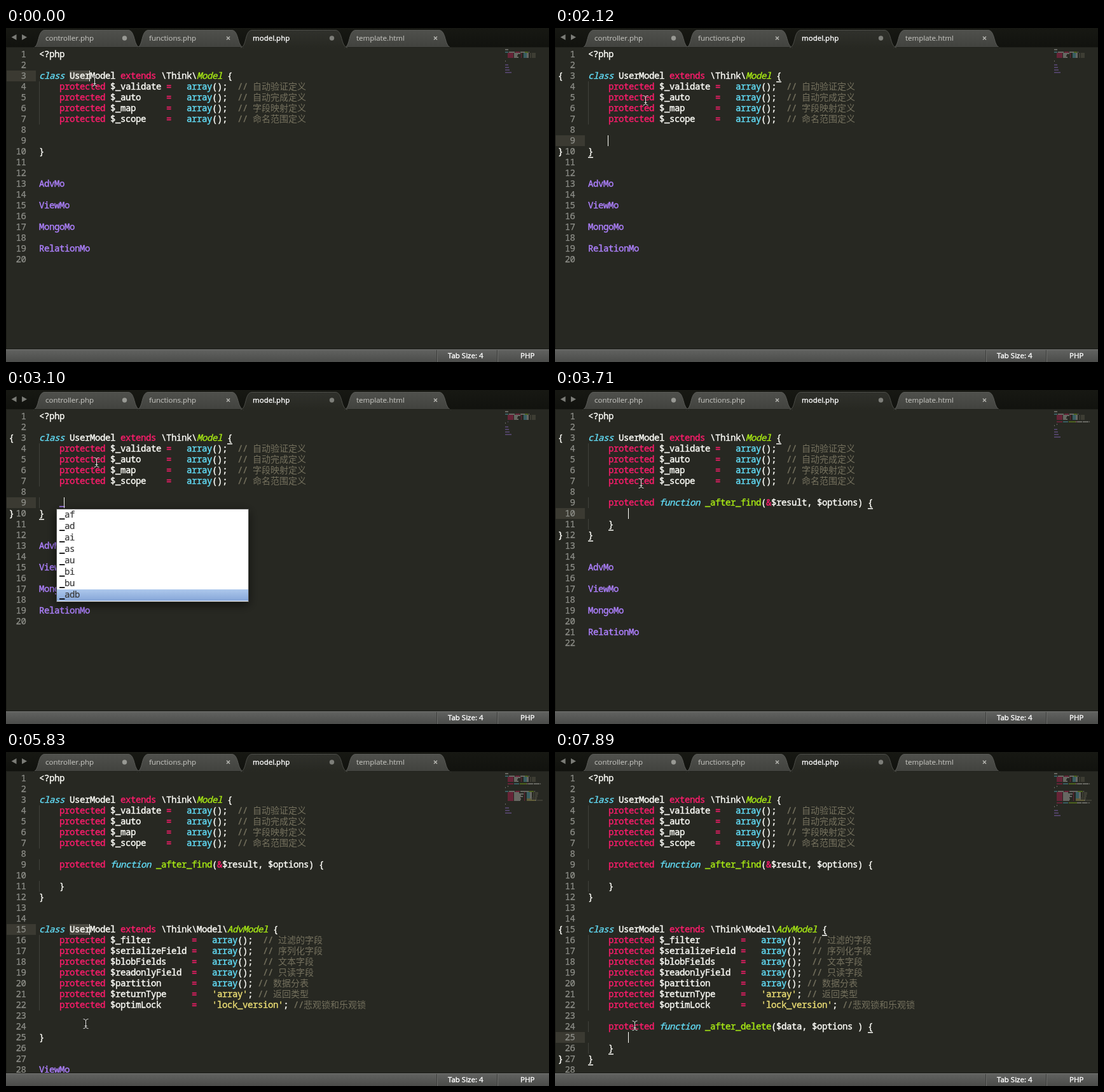
Write an HTML page with a canvas that moves like this. It is 854 px wide and 526 px high and loops after 8000 ms.

```html
<!DOCTYPE html>
<html lang="en">
<head>
<meta charset="utf-8">
<title>Editor</title>
<style>
  html, body { margin: 0; width: 100%; height: 100%; overflow: hidden; background: #272822; }
  canvas { display: block; }
</style>
</head>
<body>
<canvas id="stage" width="854" height="526"></canvas>
<script>
const LOOP = 8000, LEFT = 52, TOP = 33, CH = 8, ROW = 17;
const ctx = document.getElementById('stage').getContext('2d');
const MONO = '14px "Noto Sans Mono", "DejaVu Sans Mono", monospace';
const CJK = '14px "Noto Sans CJK SC", "Noto Sans CJK", sans-serif';
const UI = '11.5px "Open Sans", "Noto Sans", sans-serif';
const C = {
  bg: '#272822', white: '#fdfdf8', pink: '#fb1c6b', cyan: '#62dcf6', green: '#a8ea14',
  yellow: '#ebdd74', purple: '#ae81ff', grey: '#75715e'
};

// ---- document ----
const fields = ['validate =   array();  // 自动验证定义', 'auto     =   array();  // 自动完成定义',
  'map      =   array();  // 字段映射定义', 'scope    =   array();  // 命名范围定义']
  .map(s => '    protected $_' + s);
const advFields = ['_filter        =   array();  // 过滤的字段', 'serializeField =   array();  // 序列化字段',
  'blobFields     =   array();  // 文本字段', 'readonlyField  =   array();  // 只读字段',
  'partition      =   array(); // 数据分表', "returnType     =   'array'; // 返回类型",
  "optimLock      =   'lock_version'; //悲观锁和乐观锁"]
  .map(s => '    protected $' + s);
const method = sig => ['    protected function _after_' + sig + ' {', '', '    }'];

function lines(s) {
  const find = s.find ? method('find(&$result, $options)') : ['    ' + s.word];
  const del = s.del ? method('delete($data, $options )') : ['    ' + s.word2];
  const adv = s.adv
    ? ['class UserModel extends \\Think\\Model\\AdvModel {', ...advFields, '', ...del, '}', '']
    : ['AdvMo'];
  return ['<?php', '', `class ${s.name}Model extends \\Think\\Model {`, ...fields, '', ...find, '}', '', '',
    ...adv, '', 'ViewMo', '', 'MongoMo', '', 'RelationMo', ''];
}

// ---- syntax colours ----
const rules = [
  ['\\/\\/.*', C.grey], ["'[^']*'", C.yellow], ['\\b(?:class|function)\\b', C.cyan, 1],
  ['\\b(?:protected|extends)\\b|[=&]', C.pink], ['array(?=\\()', C.cyan],
  ['\\w+(?= \\{$)', C.green, 1], ['_after_\\w+', C.green], ['(?<=^\\s*)\\w+$', C.purple]
];
const lexer = new RegExp(rules.map(r => `(${r[0]})`).join('|'), 'g');

function tokens(line) {
  const out = [];
  let at = 0;
  for (const m of line.matchAll(lexer)) {
    if (m.index > at) out.push([at, line.slice(at, m.index), C.white]);
    const rule = rules[m.slice(1).findIndex(g => g !== undefined)];
    out.push([m.index, m[0], rule[1], rule[2]]);
    at = m.index + m[0].length;
  }
  if (at < line.length) out.push([at, line.slice(at), C.white]);
  return out;
}

// ---- completion lists, matched letters in brackets ----
const userItems = ['user_error', 'use_soap_error_handler', 'fbsql_username', 'call_user_func',
  'call_user_method', 'ignore_user_abort', 'call_user_func_array', 'call_user_method_array'];
const userList = q => userItems.map(s => s.includes(q)
  ? s.replace(q, `[${q}]`) : s.replace('us', '[us]').replace('er', '[er]'));
const uList = 'usort usleep unset uasort uksort ucfirst ucwords unlink'.split(' ').map(s => '[u]' + s.slice(1));
const hooks = '_af _ad _ai _as _au _bi _bu _adb'.split(' ');
const hookList = q => hooks.filter(s => s.startsWith(q)).map(s => `[${q}]` + s.slice(q.length));

const pop = (row, col, items, sel = 0, bar = false) => ({ row, col, items, sel, bar });
const hook = (row, q) => pop(row, 4, hookList(q), q === '_' ? 7 : 0);
const first = (q, items) => ({ name: 'U' + q.slice(1), sel: null, col: 6 + q.length, pop: pop(3, 6, items, 0, true) });
const type1 = (q, open = true) => ({ word: q, col: 4 + q.length, pop: open && q ? hook(9, q) : null });
const type2 = q => ({ word2: q, col: 4 + q.length, pop: hook(24, q) });

// ---- timeline: each step changes part of the state ----
const steps = [
  [0, { name: 'User', word: '', word2: '', find: 0, adv: 0, del: 0, row: 3, col: 10, sel: 3, pop: null, braces: [], caret: 1 }],
  [170, { caret: .5 }], [260, { caret: 0 }], [350, { caret: .5 }], [440, { caret: 1 }],
  [620, first('u', uList)],
  [790, first('us', userList('us'))],
  [970, first('use', userList('use'))],
  [1150, first('user', userList('user'))],
  [1410, { pop: null }],
  [1500, { row: 9, col: 4, braces: [[3, 37, '{'], [10, 0, '}']] }],
  [2030, { caret: .5 }], [2120, { caret: 1 }],
  [2200, type1('_')], [2380, type1('_a')], [2650, type1('_')], [2740, type1('')],
  [2920, type1('_', false)], [3100, type1('_')], [3190, type1('_a')], [3360, type1('_af')],
  [3450, { find: 1, pop: null, row: 10, col: 8, braces: [[3, 37, '{'], [12, 0, '}'], [9, 55], [11, 4]] }],
  [3980, { row: 15, col: 5, braces: [] }],
  [4160, { pop: pop(15, 0, ['[AdvMo]del']) }],
  [4430, { adv: 1, pop: null, sel: 15, col: 10 }],
  [4950, { caret: .5 }], [5040, { caret: 0 }], [5300, { caret: .5 }], [5390, { caret: 1 }],
  [6010, { row: 24, col: 4, sel: null, braces: [[15, 46, '{'], [25, 0, '}']] }],
  [6280, { caret: 0 }], [6460, { caret: .5 }], [6550, { caret: 1 }],
  [7170, type2('_')], [7350, type2('_a')], [7530, type2('_ad')], [7710, type2('_adb')],
  [7800, { del: 1, pop: null, row: 25, col: 8, braces: [[15, 46, '{'], [27, 0, '}'], [24, 55], [26, 4]] }]
];
const path = [[0, 139, 84], [1400, 139, 84], [1580, 142, 114], [3500, 142, 114], [3960, 108, 280],
  [4250, 132, 278], [4940, 132, 278], [5830, 125, 431], [LOOP, 125, 431]];

const stateAt = t => Object.assign({}, ...steps.filter(s => s[0] <= t).map(s => s[1]));

function mouseAt(t) {
  const i = path.findIndex(p => p[0] > t), [t0, x0, y0] = path[i - 1], [t1, x1, y1] = path[i];
  const k = (t - t0) / (t1 - t0), e = k * k * (3 - 2 * k);
  return [Math.round(x0 + (x1 - x0) * e), Math.round(y0 + (y1 - y0) * e)];
}

// ---- drawing ----
const rowY = n => TOP + (n - 1) * ROW;
const colX = c => LEFT + c * CH;

function rect(x, y, w, h, color) {
  ctx.fillStyle = color;
  ctx.fillRect(x, y, w, h);
}
// weight: extra outline, as in smoothed desktop text
function text(s, x, y, color, { font = MONO, align = 'left', weight = .4 } = {}) {
  ctx.font = font;
  ctx.letterSpacing = font.endsWith(MONO) ? '-0.4px' : '0px';
  ctx.textAlign = align;
  ctx.fillStyle = ctx.strokeStyle = color;
  ctx.lineWidth = weight;
  ctx.fillText(s, x, y);
  if (weight) ctx.strokeText(s, x, y);
}
function shade(y0, y1, a, b) {
  const g = ctx.createLinearGradient(0, y0, 0, y1);
  g.addColorStop(0, a);
  g.addColorStop(1, b);
  return g;
}
function shape(d, fill, stroke, width = 1) {
  const p = new Path2D(d);
  if (fill) { ctx.fillStyle = fill; ctx.fill(p); }
  if (stroke) { ctx.strokeStyle = stroke; ctx.lineWidth = width; ctx.stroke(p); }
}

function tab(name, i, active, dirty) {
  const x = 62 + i * 163;
  const d = `M${x - 19} 31C${x - 9} 29 ${x - 13} 3.5 ${x - 1} 3.5H${x + 130}C${x + 142} 3.5 ${x + 138} 29 ${x + 149} 31`;
  shape(d, active ? shade(3, 31, '#30312c', C.bg) : shade(3, 31, '#4f504c', '#41423e'), active ? '#4c4d48' : '#5a5b57');
  text(name, x, 20, active ? '#fff' : '#bdbdb8', { font: UI, weight: active ? .35 : .15 });
  if (dirty) {
    ctx.beginPath();
    ctx.arc(x + 124.5, 16, 3.7, 0, 7);
    ctx.fillStyle = active ? '#7d7e79' : '#989994';
    ctx.fill();
  } else {
    shape(`M${x + 122} 13.5l5 5m0-5l-5 5`, null, '#b5b5b0', 1.5);
  }
}

function tabs() {
  rect(0, 0, 854, 31, shade(0, 31, '#171813', '#11120e'));
  shape('M16.5 10v9l-8-4.5zM25 10v9l8-4.5z', '#7b7c77');
  tab('template.html', 3, false, false);
  tab('functions.php', 1, false, false);
  tab('controller.php', 0, false, true);
  rect(0, 30, 854, 1, '#20211c');
  tab('model.php', 2, true, true);
}

function status() {
  rect(0, 505, 854, 21, shade(506, 526, '#626361', '#4b4c4a'));
  rect(0, 505, 854, 1, '#1c1d19');
  rect(0, 506, 854, 1, '#747573');
  for (const x of [677, 772]) {
    rect(x, 507, 1, 19, '#3c3d3b');
    rect(x + 1, 507, 1, 19, '#6d6e6c');
  }
  text('Tab Size: 4', 695, 520, '#fff', { font: UI });
  text('PHP', 809, 520, '#fff', { font: UI });
}

function code(s) {
  rect(1, rowY(s.row), 46, ROW, '#3b3a32');
  if (s.sel) rect(colX(6), rowY(s.sel), 32, ROW, '#4b4a42');
  lines(s).forEach((line, i) => {
    const y = rowY(i + 1), base = y + 13;
    if (y < 506) {
      text(i + 1, 31.5, base, '#8f908a', { align: 'right', weight: .25 });
      if (/^ {4}\S/.test(line)) rect(LEFT, y, 1, ROW, '#41423b');
    }
    for (const [col, str, color, slant] of tokens(line)) {
      const split = str.search(/[\u4e00-\u9fff]/);
      if (y < 506) {
        text(split < 0 ? str : str.slice(0, split), colX(col), base, color, { font: (slant ? 'italic ' : '') + MONO });
        if (split >= 0) text(str.slice(split), colX(col + split), base, color, { font: CJK, weight: 0 });
      }
      ctx.globalAlpha = .5;
      [...str].forEach((c, k) => c !== ' ' && rect(785 + col + k, 33.5 + i * 2, 1, 1.2, color));
      ctx.globalAlpha = 1;
    }
  });
  for (const [row, col, mark] of s.braces) {
    rect(colX(col), rowY(row) + 17, 8, 1.5, C.white);
    if (mark) text(mark, 4.5, rowY(row) + 13, C.white);
  }
  ctx.globalAlpha = s.caret;
  rect(colX(s.col) - 1, rowY(s.row), 1, ROW, C.white);
  ctx.globalAlpha = 1;
}

function popup({ row, col, items, sel, bar }) {
  const x = colX(col) - 5, y = rowY(row) + 18, w = 303, h = items.length * 18 + 2;
  ctx.save();
  ctx.shadowColor = 'rgba(0,0,0,.6)';
  ctx.shadowBlur = 14;
  ctx.shadowOffsetY = 4;
  rect(x, y, w, h + 1, '#4c4d4b');
  ctx.restore();
  rect(x + 1, y + 1, w - 2, h - 1, '#fff');
  items.forEach((item, i) => {
    const top = y + 1 + i * 18;
    if (i === sel) rect(x + 1, top, w - 2, 18, shade(top, top + 18, '#adc8ec', '#86a6d8'));
    let at = x + 5;
    item.split(/[\[\]]/).forEach((part, k) => {
      const bold = k % 2;
      text(part, at, top + 13, bold ? '#000' : '#3a3a3a', { font: (bold ? 'bold ' : '') + MONO, weight: bold ? 0 : .2 });
      at += part.length * CH;
    });
  });
  if (bar) {
    ctx.beginPath();
    ctx.roundRect(x + 292, y + 3, 7, 38, 3.5);
    ctx.fillStyle = '#62656b';
    ctx.fill();
  }
}

function pointer(x, y, arrow) {
  ctx.save();
  ctx.translate(x, y);
  if (arrow) {
    shape('M0 0V15L3.6 11.8L6 17L8.5 16L6.2 10.8H11Z', '#111', '#fff', 1.2);
  } else {
    const d = 'M-3.5-7.5Q0-7.5.5-5Q1-7.5 4.5-7.5M.5-5V5M-3.5 7.5Q0 7.5.5 5Q1 7.5 4.5 7.5M-1.5 3.5H2.5';
    shape(d, null, 'rgba(20,20,18,.6)', 2.5);
    shape(d, null, '#e9e9e6', 1);
  }
  ctx.restore();
}

function draw(t) {
  const s = stateAt(t);
  const [mx, my] = mouseAt(Math.floor(t / 88.6) * 88.6);
  rect(0, 0, 854, 526, C.bg);
  rect(0, 31, 1, 475, '#1d1e19');
  code(s);
  tabs();
  status();
  if (s.pop) popup(s.pop);
  pointer(mx, my, s.sel === 15 && t >= 4600 && my < 289);
}

const start = performance.now();
function tick() {
  draw((performance.now() - start) % LOOP);
  requestAnimationFrame(tick);
}
tick();
</script>
</body>
</html>
```
